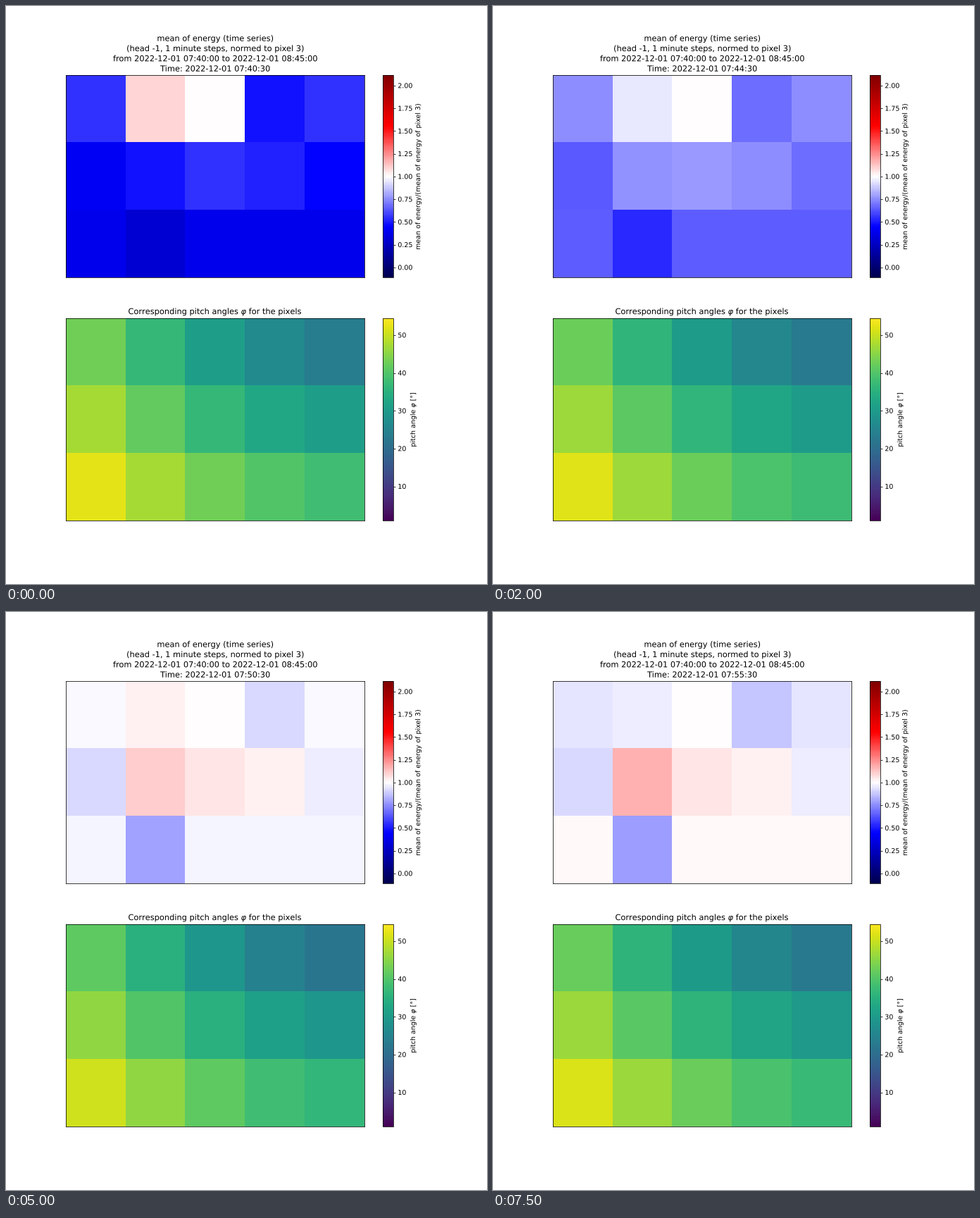
These frames come from a looping animation (683 px wide and 820 px high, 8000 ms). A matplotlib script:

```python
import matplotlib.pyplot as plt
import numpy as np
from matplotlib.animation import FuncAnimation
from matplotlib.patheffects import Normal
from matplotlib.text import Text

W, H, DPI = 683, 820, 68.3
STEPS, STEP_MS = 16, 500
LINE_PT = 15.1

# Mean energy level by minute, and the drift of the pitch angles held from a minute on.
LEVEL = {0: .47, 1: .62, 4: .70, 6: .69, 8: .90, 12: 1.06, 15: .98}
DRIFT = {0: .8, 1: .3, 5: 0, 8: -.9, 15: 0}

ROW, COL = np.mgrid[0:3, 0:5]

plt.rcParams.update({"font.family": "DejaVu Sans", "text.hinting": "none"})


def energy_at(step):
    level = np.interp(step, list(LEVEL), list(LEVEL.values()))
    tilt = .08 - .115 * step / (STEPS - 1)
    grid = level + tilt * (1 - ROW)
    grid[1] += .1 - .07 * np.abs(COL[1] - 2.3)
    # The second column spreads apart: a fading peak, a rise and a loss.
    grid[:, 1] += [.54 * np.exp(-step / 4), .012 * step, -.08 - .01 * step]
    grid[0, 3] -= .07
    grid[0, 2] = 1
    return grid


def pitch_at(step):
    drift = DRIFT[max(k for k in DRIFT if k <= step)]
    return np.hypot(7.75 * (4.62 - COL), 7.4 * (ROW + 3)) + drift


def add_panel(ax, data, cmap, limits, label, ticks):
    img = ax.imshow(data, cmap=cmap, vmin=limits[0], vmax=limits[1],
                    aspect="auto", interpolation="nearest")
    ax.set(xticks=[], yticks=[])
    fig.colorbar(img, ax=ax, label=label, ticks=ticks)
    return img


def add_title(ax, lines):
    """Stack centred lines above the panel and return the lowest."""
    for k, line in enumerate(reversed(lines)):
        text = ax.annotate(line, (.5, 1), xycoords="axes fraction",
                           xytext=(0, 6 + k * LINE_PT), textcoords="offset points",
                           ha="center", va="baseline", fontsize=12)
        if k == 0:
            lowest = text
    return lowest


# The small surplus keeps the pixel size from being floored.
fig, (top, low) = plt.subplots(
    2, 1, figsize=((W + 1e-3) / DPI, (H + 1e-3) / DPI), dpi=DPI, facecolor="white")

energy_img = add_panel(top, energy_at(0), "seismic", (-.1125, 2.1125),
                       "mean of energy/(mean of energy of pixel 3)",
                       np.arange(0, 2.01, .25))
pitch_img = add_panel(low, pitch_at(0), "viridis", (1, 54.5),
                      r"pitch angle $\varphi$ [°]", range(10, 51, 10))

clock = add_title(top, ["mean of energy (time series)",
                        "(head -1, 1 minute steps, normed to pixel 3)",
                        "from 2022-12-01 07:40:00 to 2022-12-01 08:45:00",
                        "Time: 2022-12-01 07:40:30"])
add_title(low, [r"Corresponding pitch angles $\varphi$ for the pixels"])

# Text drawn as outlines keeps even letter spacing at this small size.
for text in fig.findobj(Text):
    text.set_path_effects([Normal()])


def update(step):
    energy_img.set_data(energy_at(step))
    pitch_img.set_data(pitch_at(step))
    clock.set_text(f"Time: 2022-12-01 07:{40 + step}:30")
    return energy_img, pitch_img, clock


anim = FuncAnimation(fig, update, frames=STEPS, interval=STEP_MS,
                     repeat=True, repeat_delay=0, blit=False)
plt.show()
```
